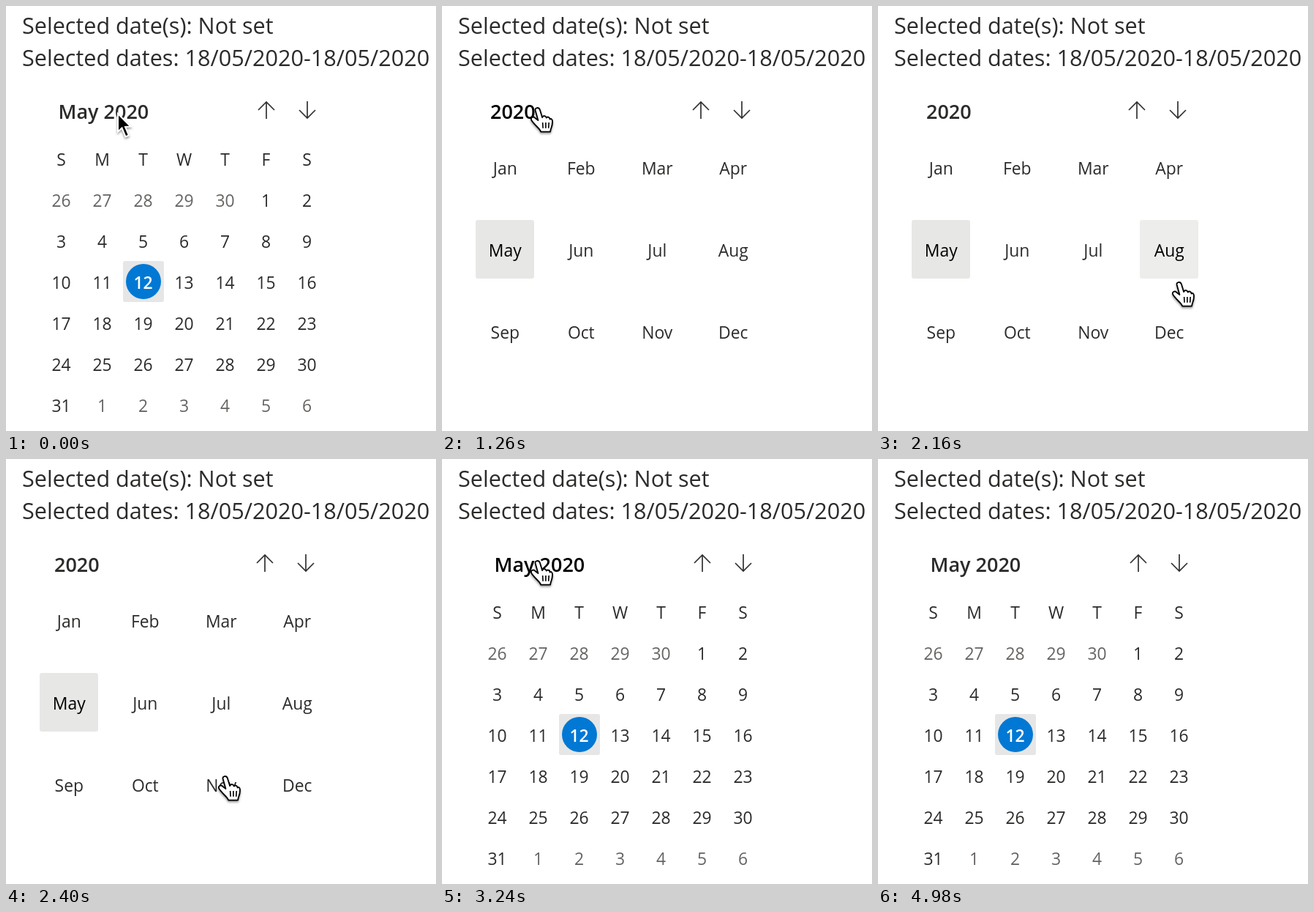
An HTML page that plays this animation: 588x580 px, repeating every 5040 ms.

```html
<!DOCTYPE html>
<html lang="en">
<head>
<meta charset="utf-8">
<title>Date picker</title>
<style>
  html, body { margin: 0; width: 100%; height: 100%; overflow: hidden; background: #fff; }
  svg { display: block; width: 588px; height: 580px; font: 22.9px "Open Sans", "Noto Sans", sans-serif; fill: #2c2b2a; }
  .intro { font-size: 30.6px; }
  .title { font-size: 27px; font-weight: 600; }
  .mid { text-anchor: middle; }
  .other { fill: #666462; }
  .today { fill: #fff; font-weight: 600; }
  .arrow { fill: none; stroke: #323130; stroke-width: 1.7; }
  .hot { fill: #000; }
  #cursor { filter: drop-shadow(0 2px 1.5px #0006); }
</style>
</head>
<body>
<svg viewBox="0 0 588 580">
  <text class="intro" x="22" y="38">Selected date(s): Not set</text>
  <text class="intro" x="22" y="82">Selected dates: 18/05/2020-18/05/2020</text>
  <g id="days"></g>
  <g id="months"></g>
  <g id="cursor">
    <path id="pointer" d="M0 0V24.5L5.5 19.5 10.5 31.5 15 29.5 10 18 17.5 17.5Z" fill="#000" stroke="#fff" stroke-width="2"/>
    <g id="hand" transform="translate(-.5 -.5) scale(.95 .97)" stroke="#000" stroke-width="1.9" stroke-linejoin="round">
      <path fill="#fff" d="M-3 1C-4-3 2-4 3.5 0L7 11C8 8 12 8 13 11.5C14 9.500 17.500 10 18 13.500C20 12 22 14 21.500 18C21.500 24 19 26 18.500 31H5C3 26-4 22-8.500 15C-10.500 11-6 9-3.500 11.500L1 15Z"/>
      <path d="M7.500 18l.5 8M12 18v8M16.500 18l-.5 8" fill="none" stroke-width="1.700"/>
    </g>
  </g>
</svg>
<script>
const LOOP = 5040, STEP = 60;
const OPEN_MONTHS = 1140, OPEN_DAYS = 2940, HIDE_CURSOR = 3300;
const $ = id => document.getElementById(id);

function add(parent, tag, attrs, text = "") {
  const node = document.createElementNS("http://www.w3.org/2000/svg", tag);
  for (const key in attrs) node.setAttribute(key, attrs[key]);
  node.textContent = text;
  return parent.appendChild(node);
}

const label = (parent, x, y, text, cls = "") =>
  add(parent, "text", { x, y, class: "mid " + cls }, text);

function addHeader(parent, x, text, upX) {
  add(parent, "path", { class: "arrow",
    d: `M${upX} 154V131m-11 11l11-11 11 11M${upX + 56} 130v23m-11-11l11 11 11-11` });
  return add(parent, "text", { x, y: 154, class: "title" }, text);
}

// Day view
const days = $("days");
const dayTitle = addHeader(days, 71.5, "May 2020", 356);
add(days, "rect", { x: 160, y: 348, width: 56, height: 56, rx: 3, fill: "#e6e6e6" });
add(days, "circle", { cx: 188, cy: 376, r: 24, fill: "#0078d4" });
[..."SMTWTFS"].forEach((name, i) => label(days, 75.5 + 56 * i, 218, name));
for (let i = 0; i < 42; i++) {
  const n = i - 4;
  const date = n < 1 ? n + 30 : n > 31 ? n - 31 : n;
  const cls = n === 12 ? "today" : date !== n ? "other" : "";
  label(days, 75.5 + 56 * (i % 7), 274 + 56 * Math.floor(i / 7), date, cls);
}

// Month view
const months = $("months");
const monthTitle = addHeader(months, 66, "2020", 354);
const cells = "Jan Feb Mar Apr May Jun Jul Aug Sep Oct Nov Dec".split(" ").map((name, i) => {
  const x = 46 + 104 * (i % 4), y = 180 + 112 * Math.floor(i / 4);
  const box = add(months, "rect", { x, y, width: 80, height: 80, rx: 3 });
  return { x, y, box, text: label(months, x + 40.3, y + 50, name), chosen: name === "May" };
});

// Cursor stops: time, x, y
const stops = [
  [0, 153, 147], [240, 131, 142], [1500, 131, 142], [1860, 178, 242], [2160, 412, 380],
  [2280, 400, 432], [2400, 300, 436], [2520, 190, 400], [2640, 145, 260], [2760, 131, 142],
  [LOOP, 131, 142]
];

function cursorAt(t) {
  const i = Math.max(1, stops.findIndex(s => s[0] >= t));
  const [t0, x0, y0] = stops[i - 1], [t1, x1, y1] = stops[i];
  const p = (t - t0) / (t1 - t0);
  const k = p * p * (3 - 2 * p);
  return [x0 + (x1 - x0) * k, y0 + (y1 - y0) * k];
}

const show = (node, on) => node.setAttribute("visibility", on ? "visible" : "hidden");

function draw(t) {
  const inMonths = t >= OPEN_MONTHS && t < OPEN_DAYS;
  const visible = t < HIDE_CURSOR;
  const [x, y] = cursorAt(t);
  show(days, !inMonths);
  show(months, inMonths);
  show($("pointer"), visible && t < STEP);
  show($("hand"), visible && t >= STEP);
  $("cursor").setAttribute("transform", `translate(${x} ${y})`);

  const onTitle = visible && t >= STEP && y < 165;
  dayTitle.classList.toggle("hot", onTitle);
  monthTitle.classList.toggle("hot", onTitle);

  // Hover trails the cursor by one step
  const [hx, hy] = cursorAt(Math.max(0, t - STEP));
  for (const c of cells) {
    const hover = hx >= c.x && hx < c.x + 80 && hy >= c.y && hy < c.y + 80;
    c.box.setAttribute("fill", c.chosen ? "#e7e7e6" : hover ? "#ededec" : "none");
    c.text.classList.toggle("hot", hover || c.chosen);
  }
}

function tick() {
  const t = performance.now() % LOOP;
  draw(Math.floor(t / STEP) * STEP);
  requestAnimationFrame(tick);
}
tick();
</script>
</body>
</html>
```
